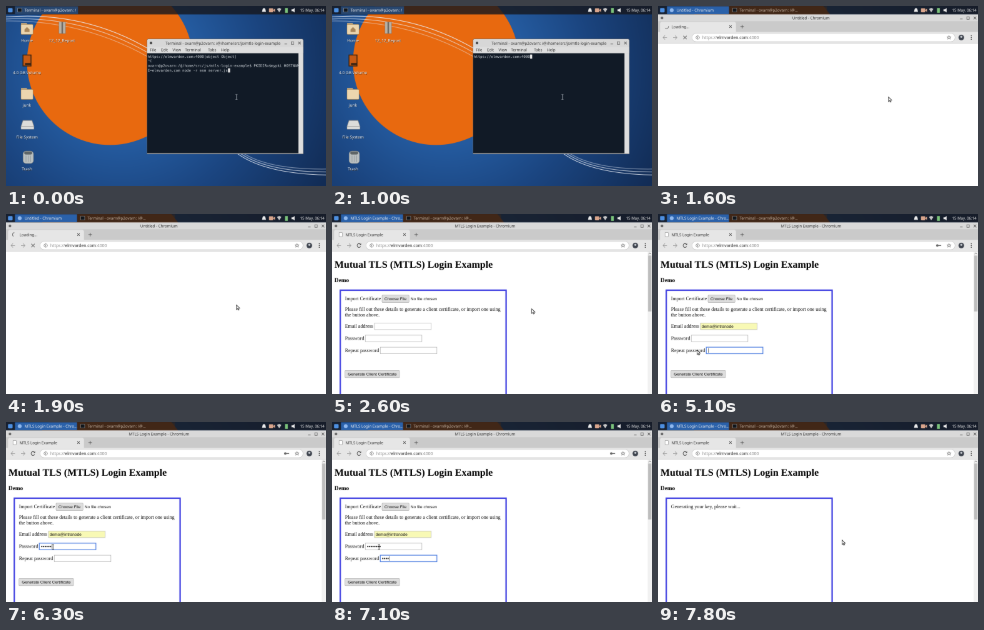
These frames come from a looping animation (320 px wide and 180 px high, 8000 ms). An HTML page with a canvas:

```html
<!DOCTYPE html>
<html lang="en">
<head>
<meta charset="utf-8">
<title>Login demo</title>
<style>
html, body { margin: 0; width: 100%; height: 100%; overflow: hidden; background: #000; }
canvas { display: block; width: 100vw; height: 100vh; }
</style>
</head>
<body>
<canvas id="stage" width="320" height="180"></canvas>
<script>
const LOOP = 8000, STEP = 50, SCALE = 3.2;
const SANS = '"Liberation Sans", Arial, sans-serif';
const UI = '"Noto Sans", "Open Sans", sans-serif';
const SERIF = '"Liberation Serif", "Times New Roman", serif';
const MONO = '"DejaVu Sans Mono", monospace';
const HOST = 'elmvarden.com', USER = 'ovarn@p2ovarn', EMAIL = 'demo@intranode';
const DIR = '/@/home/src/js/mtls-login-example';

const view = document.getElementById('stage').getContext('2d');
view.imageSmoothingQuality = 'high';
// The desktop is drawn at 1024 x 576 and scaled down for soft, small type.
const desktop = document.createElement('canvas');
desktop.width = 1024;
desktop.height = 576;
const c = desktop.getContext('2d');

function rect(x, y, w, h, fill, stroke, line = 0.32) {
  if (fill) { c.fillStyle = fill; c.fillRect(x, y, w, h); }
  if (stroke) { c.strokeStyle = stroke; c.lineWidth = line; c.strokeRect(x, y, w, h); }
}
function round(x, y, w, h, r, fill, stroke) {
  c.beginPath();
  c.roundRect(x, y, w, h, r);
  if (fill) { c.fillStyle = fill; c.fill(); }
  if (stroke) { c.strokeStyle = stroke; c.lineWidth = 0.32; c.stroke(); }
}
function disc(x, y, r, fill) {
  c.beginPath();
  c.arc(x, y, r, 0, 7);
  c.fillStyle = fill;
  c.fill();
}
function path(points, stroke, line = 0.5, fill) {
  c.beginPath();
  points.forEach(([x, y], i) => i ? c.lineTo(x, y) : c.moveTo(x, y));
  if (fill) { c.closePath(); c.fillStyle = fill; c.fill(); }
  if (stroke) { c.strokeStyle = stroke; c.lineWidth = line; c.stroke(); }
}
function arc(x, y, r, from, to, color, line = 0.6) {
  c.beginPath();
  c.arc(x, y, r, from, to);
  c.strokeStyle = color;
  c.lineWidth = line;
  c.stroke();
}
function text(s, x, y, size, family, fill = '#111', align = 'left', weight = '') {
  c.font = `${weight} ${size}px ${family}`;
  c.textAlign = align;
  c.fillStyle = fill;
  c.fillText(s, x, y);
}
function curve(x0, y0, x1, y1, x2, y2, color, line) {
  c.beginPath();
  c.moveTo(x0, y0);
  c.quadraticCurveTo(x1, y1, x2, y2);
  c.strokeStyle = color;
  c.lineWidth = line;
  c.stroke();
}
function cross(x, y, r, color = '#444') {
  path([[x - r, y - r], [x + r, y + r]], color);
  path([[x + r, y - r], [x - r, y + r]], color);
}

function wallpaper() {
  const glow = c.createRadialGradient(115, 60, 80, 115, 60, 235);
  glow.addColorStop(0, '#245a9e');
  glow.addColorStop(0.4, '#1b4580');
  glow.addColorStop(1, '#122c55');
  rect(0, 0, 320, 180, glow);
  disc(104, 56, 83, '#e8690f');
  for (let i = 0; i < 3; i++) {
    const color = `rgba(235,240,248,${0.85 - i * 0.2})`;
    curve(0, 11 + i * 2, 88, 4 + i * 5, 160, 54 + i * 4, color, 0.7);
    curve(228 + i * 3, 145, 256 + i * 2, 168 - i * 2, 322, 169 - i * 3, color, 0.7);
  }
}

function folder(x, y) {
  round(x - 6, y - 6, 6, 3, 0.6, '#cfae7c');
  round(x - 6, y - 4.6, 12, 10, 0.8, '#ecd6af', '#a08050');
}
function drive(x, y, body, edge) {
  path([[x - 4.5, y - 4], [x + 4.5, y - 4], [x + 6.5, y + 2], [x - 6.5, y + 2]], edge, 0.5, body);
  round(x - 6.5, y + 2, 13, 2.8, 0.5, body, edge);
}
function desktopIcons() {
  folder(21, 23);
  path([[18.5, 23.5], [21, 21], [23.5, 23.5], [23.5, 26], [18.5, 26]], '', 0, '#a9865a');
  rect(53, 16, 6.5, 11.5, '#b9b1a5', '#777');
  rect(55.5, 16, 1.5, 11.5, '#6b6660');
  rect(17, 49, 8, 11, '#c75a14', '#3a2413', 0.9);
  rect(19, 57, 6, 2, '#3a2413');
  folder(21, 88);
  drive(21.5, 118.5, '#dcdcda', '#8a8a8a');
  round(17, 145, 10.5, 12.5, 3, '#b9bfc0', '#6d7476');
  round(18.2, 145.5, 8, 3, 1.5, '#5d6466');
  for (const x of [20, 22.3, 24.6]) path([[x, 149.5], [x, 156]], '#8d9597', 0.5);
  const labels = [['Home', 21, 36], ['12_12_Report', 56, 36], ['4.0 GB Volume', 21, 68],
    ['junk', 21, 100.5], ['File System', 21, 132.5], ['Trash', 21, 164.5]];
  for (const [s, x, y] of labels) {
    text(s, x + 0.3, y + 0.4, 4.1, UI, 'rgba(0,0,0,.7)', 'center');
    text(s, x, y, 4.1, UI, '#fff', 'center');
  }
}

function panel(browser, title) {
  rect(0, 0, 320, 8.4, 'rgba(22,24,30,.82)');
  round(2, 2, 4.6, 4.4, 1, '#4d8fe0');
  const button = (x, w, s, fill, web) => {
    rect(x, 0.3, w, 7.8, fill);
    if (web) disc(x + 4.7, 4.2, 2, '#8fb8ee');
    else rect(x + 2.7, 2.2, 4, 3.8, '#10151b', '#aaa');
    text(s, x + 9.5, 5.7, 3.9, UI, web || !browser ? '#f0f0f0' : '#c9b8a7');
  };
  const term = `Terminal - ${USER}`;
  if (browser) {
    button(9, 62, title.length > 24 ? title.slice(0, 25) + '...' : title, '#2a61aa', true);
    button(72, 97, term + ': /@...', 'rgba(75,42,15,.35)');
  } else button(9, 63, term + ': /@...'.slice(0, 3), '#27466f');
  const x = 258;
  path([[x - 2, 5.8], [x - 1.3, 3], [x, 1.8], [x + 1.3, 3], [x + 2, 5.8]], '', 0, '#eee');
  round(x + 5, 2.3, 4.2, 4, 0.6, '#d9a58c');
  path([[x + 9, 4.2], [x + 11, 2.6], [x + 11, 6]], '', 0, '#d9a58c');
  path([[x + 13, 3], [x + 15.2, 1.9], [x + 17.4, 3], [x + 15.2, 6.3]], '', 0, '#c8c8c8');
  rect(x + 21, 2, 2.8, 4.8, '#7bc47b');
  path([[x + 27.5, 3.3], [x + 29, 3.3], [x + 30.6, 2], [x + 30.6, 6.5], [x + 29, 5.2], [x + 27.5, 5.2]], '', 0, '#eee');
  text('15 May, 06:14', 318.5, 5.7, 3.8, UI, '#eee', 'right');
}

function windowButtons(x, y) {
  path([[x - 15, y + 1], [x - 12.4, y + 1]], '#555');
  rect(x - 8.2, y - 1.2, 2.5, 2.5, '', '#555', 0.45);
  cross(x, y, 1.3);
}

function terminal(t) {
  round(141, 33, 156.3, 115, [1.5, 1.5, 0, 0], '#d7d7d7', '#555');
  text(`Terminal - ${USER}: ${DIR}`, 217, 38.6, 3.9, UI, '#333', 'center');
  disc(145, 37, 1.3, '#444');
  windowButtons(293.5, 37);
  rect(141.2, 41, 155.9, 6.2, '#dedede');
  const menu = { File: 144, Edit: 155, View: 166.5, Terminal: 179, Tabs: 202, Help: 215 };
  for (const [s, x] of Object.entries(menu)) text(s, x, 45.4, 3.9, UI, '#333');
  rect(141.2, 47.2, 155.9, 100, '#111a26');
  rect(292.4, 47.2, 4.7, 100, '#dedede');
  const url = `https://${HOST}:4000`;
  let lines = [url + '[object Object]', '^C',
    `${USER}:${DIR}$ PKIDIR=$mypki HOSTNAM`, `E=${HOST} node -r esm server.js`];
  if (t >= 1000) lines = [url];
  else if (t >= 250) lines = [''];
  else if (t >= 50) lines.push('');
  const advance = 2.17;
  lines.forEach((s, i) => text(s, 141.7, 51.8 + i * 4.6, advance / 0.602, MONO, '#d5dbe0'));
  const last = lines.length - 1;
  rect(141.7 + lines[last].length * advance, 48.5 + last * 4.6, 2.1, 4.2, '#e6e6e6');
}

function chrome(t, loaded) {
  const page = loaded ? 'MTLS Login Example' : 'Untitled';
  rect(0, 8.4, 320, 172, '#fff');
  rect(0, 8.4, 320, 7, '#d9d9d9');
  text(page + ' - Chromium', 153, 13.4, 3.9, UI, '#333', 'center');
  disc(4, 12, 1.3, '#666');
  windowButtons(317, 12);
  rect(0, 15.2, 320, 11, '#cacaca');
  round(2, 15.8, 76, 11, [2, 2, 0, 0], '#e6e6e6');
  if (loaded) rect(7, 18.6, 3.2, 4, '#fff', '#777');
  else arc(8.5, 20.6, 2, t / 130, t / 130 + 2.6, '#666');
  text(loaded ? page : 'Loading...', 13.5, 22.1, 3.9, UI, '#333');
  cross(72.5, 20.6, 1.2);
  path([[82.4, 20.6], [86, 20.6]], '#444');
  path([[84.2, 18.8], [84.2, 22.4]], '#444');
  rect(0, 26, 320, 11.4, '#e6e6e6');
  rect(0, 37.2, 320, 0.35, '#bdbdbd');
  for (const [x, d] of [[7, -1], [17, 1]]) {
    path([[x - 2, 31.5], [x + 2, 31.5]], '#999');
    path([[x, 29.5], [x + 2 * d, 31.5], [x, 33.5]], '#999');
  }
  if (loaded) {
    arc(27, 31.5, 1.9, 0.5, 5.6, '#444');
    path([[27.4, 31], [29.1, 31], [29.1, 29.2]], '', 0, '#444');
  } else cross(27, 31.5, 1.7);
  round(34, 27.4, 263, 8.2, 4, '#fff', '#bbb');
  disc(39.7, 31.5, 1.9, '#666');
  disc(39.7, 31.5, 1.5, '#fff');
  rect(39.5, 31.2, 0.45, 1.2, '#555');
  rect(39.5, 30.3, 0.45, 0.5, '#555');
  const parts = [['https://', '#888'], [HOST, '#222'], [':4000', '#888']];
  let x = 44.3;
  for (const [s, color] of parts) {
    text(s, x, 33, 4.25, UI, color);
    x += c.measureText(s).width;
  }
  const star = Array.from({ length: 11 }, (_, i) => {
    const a = i * Math.PI / 5 - Math.PI / 2, r = i % 2 ? 0.9 : 2;
    return [291 + r * Math.cos(a), 31.5 + r * Math.sin(a)];
  });
  path(star, '#555', 0.4);
  if (loaded && t >= 3900 && t < 7500) {
    disc(279.3, 31.5, 1.2, '#666');
    rect(280, 31.1, 3.2, 0.8, '#666');
  }
  disc(303.3, 31.5, 2.8, '#3c424c');
  disc(303.3, 30.8, 1, '#c8ccd2');
  for (const y of [29.7, 31.5, 33.3]) disc(313.3, y, 0.5, '#444');
}

function field(x, y, focused, fill = '#fff') {
  rect(x, y, 56.6, 6.5, fill, focused ? '#4f7fe0' : '#a9a9a9', focused ? 0.75 : 0.4);
}
function button(x, y, w, s) {
  round(x, y, w, 7.2, 0.6, '#dedede', '#999');
  text(s, x + w / 2, y + 5.1, 4.17, SANS, '#111', 'center');
}
function dots(x, y, n) {
  for (let i = 0; i < n; i++) disc(x + 2.5 + i * 1.75, y + 3.3, 0.68, '#222');
}
function caret(x, y) { rect(x, y + 1, 0.35, 4.5, '#111'); }

function form(t) {
  const line = (s, y) => text(s, 13, y, 5, SERIF);
  line('Import Certificate', 86.2);
  button(50, 81.2, 27, 'Choose File');
  text('No file chosen', 78.6, 86.2, 4.17, SANS);
  line('Please fill out these details to generate a client certificate, or import one using', 97);
  line('the button above.', 102.5);
  line('Email address', 113.9);
  line('Password', 126);
  line('Repeat password', 138);
  const focus = t < 3000 ? '' : t < 5100 ? 'email' : t < 6000 ? 'repeat' : t < 6750 ? 'password' : 'repeat';
  const filled = t >= 3500;
  field(42.5, 109.1, focus === 'email', filled ? '#f8f9b5' : '#fff');
  field(33.3, 121.2, focus === 'password');
  field(48.3, 133.2, focus === 'repeat');
  if (filled) text(EMAIL, 43.6, 113.8, 4.17, SANS);
  const typed = t < 6150 ? 0 : Math.min(8, Math.floor((t - 6150) / STEP) + 3);
  const again = t < 6900 ? 0 : t < 7100 ? 2 : Math.min(8, 4 + Math.floor((t - 7100) / STEP));
  dots(33.3, 121.2, typed);
  dots(48.3, 133.2, again);
  if (focus === 'password') caret(35.2 + typed * 1.75, 121.2);
  if (focus === 'repeat') caret(50.2 + again * 1.75, 133.2);
  if (focus === 'email' && !filled) caret(44, 109.1);
  button(13, 156.5, 54.5, 'Generate Client Certificate');
  if (t >= 3200 && t < 3900) {
    rect(42.8, 117.6, 56.4, 12, '#f7f7f7', '#ccc');
    rect(42.8, 119, 56.4, 9.3, t >= 3500 ? '#dfe3e4' : '#fff');
    text(EMAIL, 46, 125.3, 4.1, UI, '#333');
  }
}

function webPage(t) {
  text('Mutual TLS (MTLS) Login Example', 2.4, 53.6, 10, SERIF, '#000', 'left', 'bold');
  text('Demo', 2.4, 68, 5.85, SERIF, '#000', 'left', 'bold');
  rect(8.3, 76.2, 165.8, 130, '', '#3d3de0', 1.4);
  if (t < 7500) form(t);
  else text('Generating your key, please wait...', 13, 86.2, 5, SERIF);
  rect(315.6, 37.5, 4.4, 143, '#f1f1f1');
  rect(316.1, 41.5, 3.4, 56, '#bdbdbd');
  path([[316.6, 40.2], [317.8, 38.8], [319, 40.2]], '#666', 0.4);
}

const MOUSE = [[0, 230.5, 91], [2450, 230.5, 91], [3000, 62, 112], [3250, 62, 112],
  [3600, 80, 122], [4150, 80, 122], [4250, 76, 123], [4500, 76, 123], [4900, 39, 136],
  [5450, 39, 136], [5800, 47, 125], [7650, 47, 125], [7800, 184, 118], [LOOP, 184, 118]];

function pointer(t) {
  const i = MOUSE.findIndex((m, k) => k && t <= m[0]);
  const [t0, x0, y0] = MOUSE[i - 1], [t1, x1, y1] = MOUSE[i];
  const u = (t - t0) / (t1 - t0), e = u * u * (3 - 2 * u);
  const x = x0 + (x1 - x0) * e, y = y0 + (y1 - y0) * e;
  const beam = t < 1600 || (t >= 2950 && t < 3350) || (t >= 5750 && t < 7500);
  if (beam) {
    const color = t < 1600 ? '#aab0b8' : '#111';
    path([[x, y - 2.4], [x, y + 2.4]], color, 0.5);
    for (const d of [-2.4, 2.4]) path([[x - 1, y + d], [x + 1, y + d]], color, 0.4);
    return;
  }
  const shape = [[0, 0], [0, 4.6], [1.1, 3.6], [1.8, 5.2], [2.6, 4.9], [1.9, 3.3], [3.3, 3.2], [0, 0]];
  path(shape.map(([a, b]) => [x + a, y + b]), '#222', 0.5, '#fff');
}

function draw(t) {
  c.setTransform(SCALE, 0, 0, SCALE, 0, 0);
  const browser = t >= 1600, loaded = t >= 2200;
  wallpaper();
  panel(browser, (loaded ? 'MTLS Login Example' : 'Untitled') + ' - Chromium');
  if (!browser) {
    desktopIcons();
    terminal(t);
  } else {
    chrome(t, loaded);
    if (loaded) webPage(t);
  }
  pointer(t);
  view.drawImage(desktop, 0, 0, 320, 180);
}

const start = performance.now();
function tick() {
  const t = (performance.now() - start) % LOOP;
  draw(Math.floor(t / STEP) * STEP);
  requestAnimationFrame(tick);
}
tick();
</script>
</body>
</html>
```
